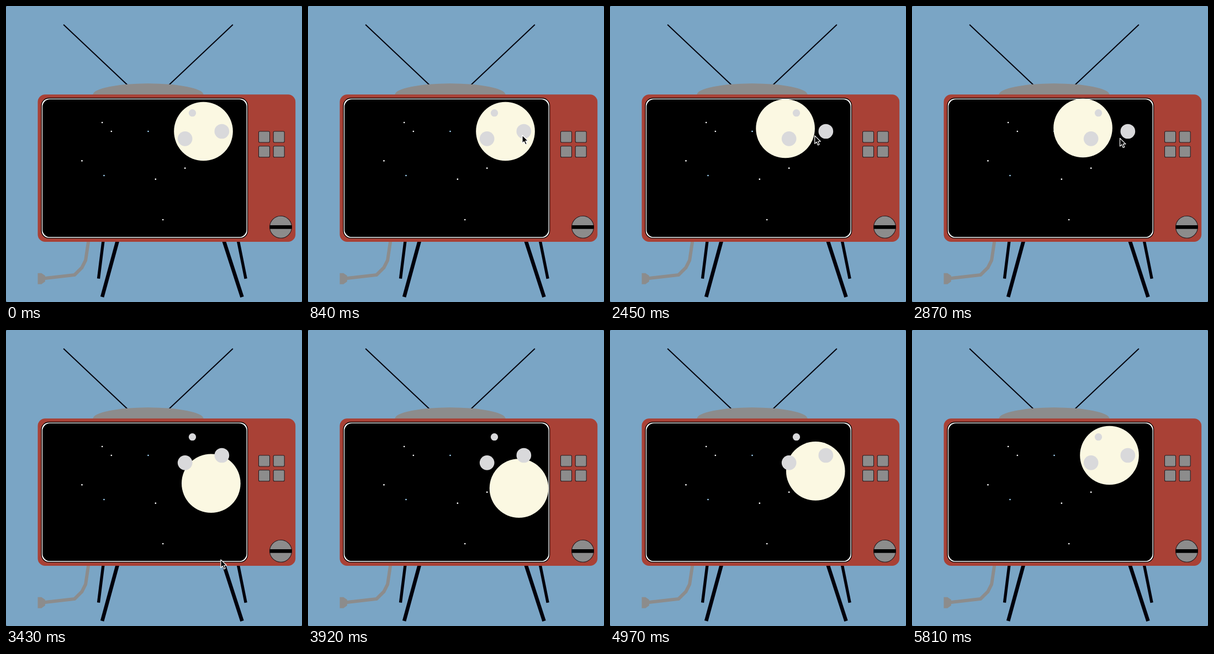
Animation of 536x536 px, one loop 5880 ms. Source, as an HTML page:

```html
<!DOCTYPE html>
<html lang="en">
<head>
<meta charset="utf-8">
<title>Moon on television</title>
<style>
  html, body { margin: 0; width: 100%; height: 100%; overflow: hidden; background: #33495b; }
  svg { display: block; width: 100vw; height: 100vh; }
  .grey { fill: #8c8c8c; }
  .line { fill: none; stroke: #00000c; }
  .key { fill: #8c8c8c; stroke: #241c20; stroke-width: .8; }
</style>
</head>
<body>
<svg viewBox="0 0 536 536">
  <rect width="536" height="536" rx="2.5" fill="#7aa5c5"/>

  <!-- The set is drawn in its own units, from the cabinet's top left corner -->
  <g transform="translate(57.5 160.33) scale(1.33333)">
    <path class="line" stroke-width="1.5" d="M35 -95L125 -10M265 -95L175 -10"/>
    <ellipse class="grey" cx="150" rx="75" ry="15"/>

    <path d="M69 198L65 225L60 235L50 245L5 250" fill="none" stroke="#8c8c8c" stroke-width="4.5"/>
    <path class="grey" d="M0 242.5H5L10 246V254L5 257.5H0Z"/>
    <path class="line" stroke-width="4" d="M89 198L82.5 250M272 198L282.5 250"/>
    <path class="line" stroke-width="5" d="M108.500 198L87.500 275M252.500 198L277.500 275"/>

    <rect width="350" height="200" rx="10" fill="#a94136"/>
    <rect x="5" y="5" width="280" height="190" rx="10" fill="#fff" stroke="#000"/>
    <rect x="6.500" y="6.500" width="277" height="187" rx="10"/>

    <g id="stars"></g>
    <circle id="moon" r="40" fill="#fbf8e2"/>
    <g id="craters" fill="#d9d9db"></g>

    <g id="keys" class="key"><circle cx="330" cy="180" r="15"/></g>
    <rect x="315" y="177.500" width="30" height="5"/>
  </g>

  <g id="cursor" stroke-linejoin="round">
    <path id="arrow" stroke="#fff" stroke-width="1.2"
      d="M0 0V14.5L3.3 11.4L5.8 17L8.3 15.900L5.900 10.400H10.500Z"/>
    <path id="hand" fill="#fff" stroke="#000" stroke-width="1.1" transform="scale(.92)"
      d="M-1.5 1.3Q-.3 -1 1.5 .8L3.3 6.3Q5 4.8 6 6.800Q8 5.500 8.800 7.500Q11 6.700 11.300 9L11.500 12.500L10 15.500V18H2.500L1 15L-3.500 10.500Q-4.300 8.200 -1.800 8.500L.700 10Z
         M4.200 11V15.500M6.300 11V15.500M8.400 11V15.500"/>
  </g>
</svg>
<script>
const LOOP = 5880, TICK = 70;
const ORIGIN = [57.5, 160.33], UNIT = 4 / 3;
const $ = id => document.getElementById(id);

function add(parent, tag, attrs) {
  const el = document.createElementNS("http://www.w3.org/2000/svg", tag);
  for (const name in attrs) el.setAttribute(name, attrs[name]);
  $(parent).append(el);
}

const stars = [[87.5, 38], [100, 50], [60, 90], [160, 115], [200, 100], [170, 170]];
const blueStars = [[150, 50], [90, 110]];
const craters = [[210, 25, 5], [250, 50, 10], [200, 60, 10]];

const addStars = (list, fill) =>
  list.forEach(([cx, cy]) => add("stars", "circle", { cx, cy, r: 1, fill }));
addStars(stars, "#fff");
addStars(blueStars, "#a9dcff");
craters.forEach(([cx, cy, r]) => add("craters", "circle", { cx, cy, r }));
for (const x of [300, 320])
  for (const y of [50, 70]) add("keys", "rect", { x, y, width: 15, height: 15, rx: 1.5 });

// The CSS "ease" curve: cubic-bezier(.25, .1, .25, 1)
function ease(p) {
  const curve = (a, b, s) => 3 * s * (1 - s) ** 2 * a + 3 * s * s * (1 - s) * b + s ** 3;
  let lo = 0, hi = 1;
  for (let i = 0; i < 24; i++) {
    const mid = (lo + hi) / 2;
    if (curve(.25, .25, mid) < p) lo = mid; else hi = mid;
  }
  return curve(.1, 1, (lo + hi) / 2);
}

const smooth = p => p * p * (3 - 2 * p);

// Every leg between two points takes the same time
const home = [225, 50];
const moonTour = { start: 1940, leg: 960, easing: ease,
  points: [home, [189, 45.5], [243.6, 95.6], [238.8, 76.6], home] };
const cursorTour = { start: 840, leg: 1015, easing: smooth,
  points: [[388, 234], [361, 227], [376.5, 239.5], [398, 545]] };

function at({ start, leg, easing, points }, t) {
  const legs = points.length - 1;
  const pos = Math.min(Math.max((t - start) / leg, 0), legs);
  const i = Math.min(Math.floor(pos), legs - 1);
  const p = easing(pos - i);
  return points[i].map((v, k) => v + (points[i + 1][k] - v) * p);
}

const inside = ([x, y], [cx, cy, r]) => Math.hypot(x - cx, y - cy) < r;
const show = (el, on) => el.setAttribute("visibility", on ? "visible" : "hidden");

function draw(now) {
  const t = Math.floor((now % LOOP) / TICK) * TICK;
  const moon = at(moonTour, t);
  $("moon").setAttribute("cx", moon[0]);
  $("moon").setAttribute("cy", moon[1]);

  const tip = at(cursorTour, t);
  const spot = tip.map((v, k) => (v - ORIGIN[k]) / UNIT);
  const active = t >= 700 && tip[1] < 536;
  const pointing = inside(spot, [...moon, 40]) && !craters.some(c => inside(spot, c));
  $("cursor").setAttribute("transform", `translate(${tip})`);
  show($("arrow"), active && !pointing);
  show($("hand"), active && pointing);
}

const start = performance.now();
function frame() {
  draw(performance.now() - start);
  requestAnimationFrame(frame);
}
frame();
</script>
</body>
</html>
```
